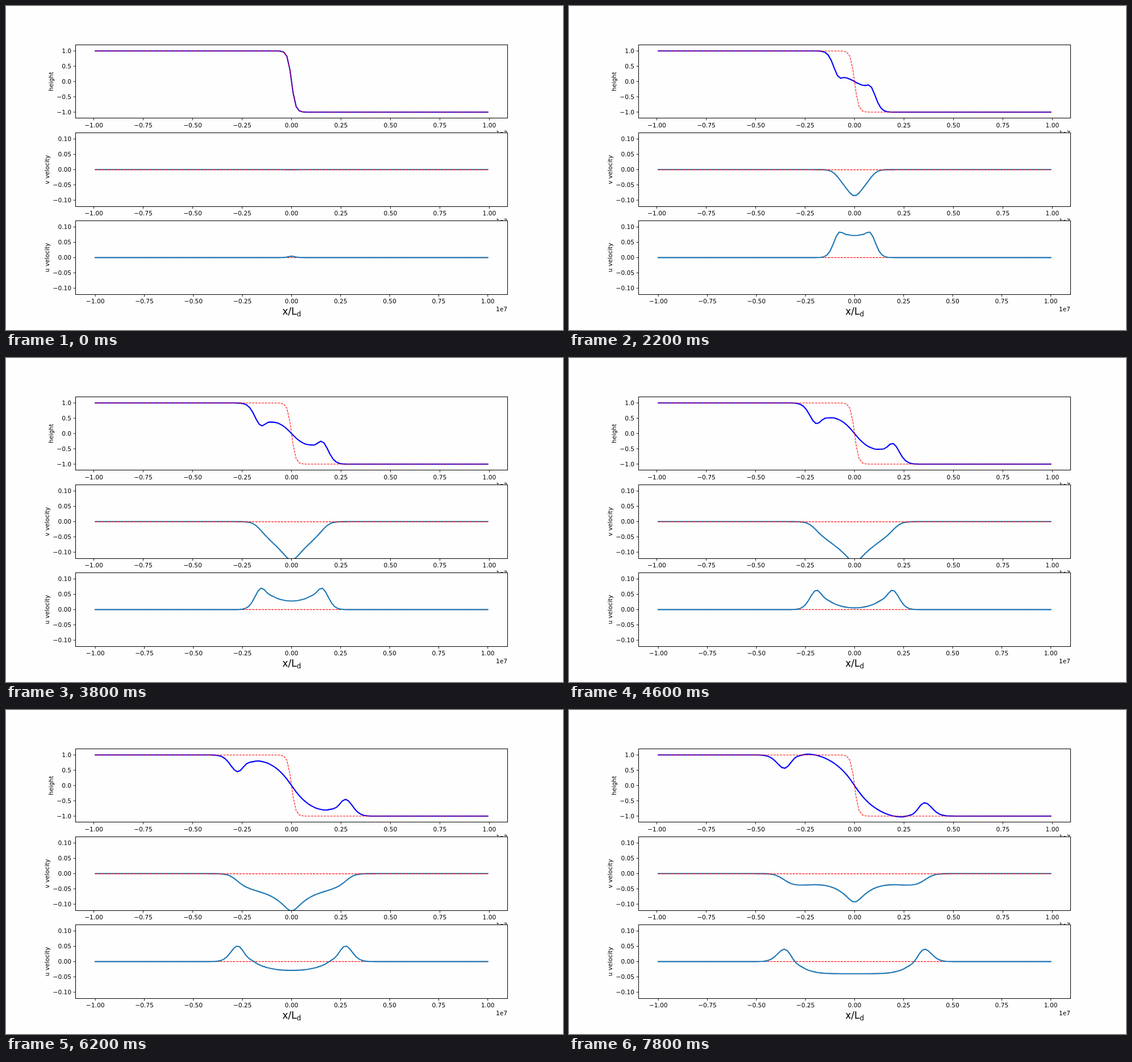
Write an HTML page that moves like this. It is 980 px wide and 571 px high and loops after 8 s.

```html
<!DOCTYPE html>
<html lang="en">
<head>
<meta charset="utf-8">
<title>Geostrophic adjustment</title>
<style>
  html, body { margin: 0; width: 100%; height: 100%; overflow: hidden; background: #fefefe; }
  svg { display: block; width: 980px; height: 571px; }
  text { font: 10.63px "DejaVu Sans", sans-serif; fill: #000; }
  .frame { fill: none; stroke: #000; stroke-width: 1; }
  .ticks { stroke: #000; stroke-width: .9; }
  .curve { fill: none; stroke-width: 2.13; stroke-linecap: square; stroke-linejoin: round; }
  .start { fill: none; stroke: #f00; stroke-width: 1.06; stroke-dasharray: 3.93 1.7; stroke-linejoin: round; }
</style>
</head>
<body>
<svg id="stage" viewBox="0 0 980 571"></svg>
<script>
const FRAMES = 40, FRAME_MS = 200, STEPS = 10;

// Linear rotating shallow water on a staggered grid
const N = 128, DX = 2e7 / N, DT = 100, G = 10, H = 1000, F = 1e-4, FRONT = 2e5;

const LEFT = 122.5, RIGHT = 882.5, MID = 502.4, SPAN = 690.5;
const panels = [
  { key: 'h', label: 'height', labelX: 82.7, top: 68.5, bottom: 197.5, zero: 133.1, unit: 53.9,
    ticks: [1, .5, 0, -.5, -1], digits: 1, color: '#00f', full: SPAN * N / (N - 1) },
  { key: 'v', label: 'v velocity', labelX: 75.7, top: 223.5, bottom: 353.5, zero: 288.3, unit: 538.7,
    ticks: [.1, .05, 0, -.05, -.1], digits: 2, color: '#1f77b4', full: SPAN * N / (N - 1), shift: .3 },
  { key: 'u', label: 'u velocity', labelX: 75.7, top: 378.5, bottom: 508.5, zero: 443.4, unit: 538.7,
    ticks: [.1, .05, 0, -.05, -.1], digits: 2, color: '#1f77b4', full: SPAN, startBelow: true },
];

// base + DT * (rates of change evaluated at state)
function advance(base, state) {
  const { h, v, u } = state;
  return {
    h: base.h.map((b, i) => b - DT * H * (u[i + 1] - u[i]) / DX),
    v: base.v.map((b, i) => b - DT * F * (u[i] + u[i + 1]) / 2),
    u: base.u.map((b, i) => i % N === 0 ? 0
      : b + DT * (F * (v[i - 1] + v[i]) / 2 - G * (h[i] - h[i - 1]) / DX)),
  };
}

// Euler-backward scheme: a forward guess, then a step with the guess's rates
function simulate() {
  const start = {
    h: Array.from({ length: N }, (_, i) => -Math.tanh((i + .5 - N / 2) * DX / FRONT)),
    v: Array(N).fill(0),
    u: Array(N + 1).fill(0),
  };
  const states = [];
  let state = start;
  for (let n = 0; n <= (FRAMES - 1) * STEPS; n++) {
    state = advance(state, advance(state, state));
    if (n % STEPS === 0) states.push(state);
  }
  return { start, states };
}

const label = (value, digits) => (value < 0 ? '\u2212' : '') + Math.abs(value).toFixed(digits);
const text = (x, y, anchor, content) =>
  `<text x="${x}" y="${Math.round(y)}" text-anchor="${anchor}">${content}</text>`;

function points(panel, values) {
  const dx = SPAN / (values.length - 1);
  return values.map((value, i) =>
    `${(MID - SPAN / 2 + i * dx).toFixed(2)},${(panel.zero - value * panel.unit).toFixed(2)}`).join(' ');
}

function panelMarkup(p, start) {
  const { key, top, bottom, zero } = p;
  const box = `x="${LEFT}" y="${top}" width="${RIGHT - LEFT}" height="${bottom - top}"`;
  const dashed = `<polyline class="start" points="${points(p, start[key])}" transform="translate(0 ${p.shift || 0})"/>`;
  const curve = `<polyline class="curve" id="${key}" stroke="${p.color}"/>`;
  let ticks = '', labels = '';
  for (let i = -4; i <= 4; i++) {
    const x = MID + i * p.full / 8;
    ticks += `M${x} ${bottom}v3.9`;
    labels += text(x, zero + 80.6, 'middle', label(i / 4, 2));
  }
  for (const value of p.ticks) {
    const y = zero - value * p.unit;
    ticks += `M${LEFT} ${y}h-3.9`;
    labels += text(115.1, y + 3.9, 'end', label(value, p.digits));
  }
  return `
    <clipPath id="clip-${key}"><rect ${box}/></clipPath>
    <rect ${box} fill="#fefefe"/>
    <g clip-path="url(#clip-${key})">${p.startBelow ? dashed + curve : curve + dashed}</g>
    <rect ${box} class="frame"/><path d="${ticks}" class="ticks"/>${labels}
    ${text(882, zero + 94.6, 'end', '1e7')}
    <text transform="translate(${p.labelX} ${zero}) rotate(-90)" text-anchor="middle">${p.label}</text>`;
}

const { start, states } = simulate();
const stage = document.getElementById('stage');
stage.innerHTML = panels.map(p => panelMarkup(p, start)).join('') +
  `<text x="502.6" y="544" text-anchor="middle" style="font-size:17px">x/L<tspan dy="3" style="font-size:11.9px">d</tspan></text>`;
const curves = panels.map(p => document.getElementById(p.key));

let shown = -1;
function draw(ms) {
  const index = Math.floor(ms / FRAME_MS) % FRAMES;
  if (index === shown) return;
  shown = index;
  panels.forEach((p, i) => curves[i].setAttribute('points', points(p, states[index][p.key])));
}

const begin = performance.now();
function tick() {
  draw(performance.now() - begin);
  requestAnimationFrame(tick);
}
tick();
</script>
</body>
</html>
```
